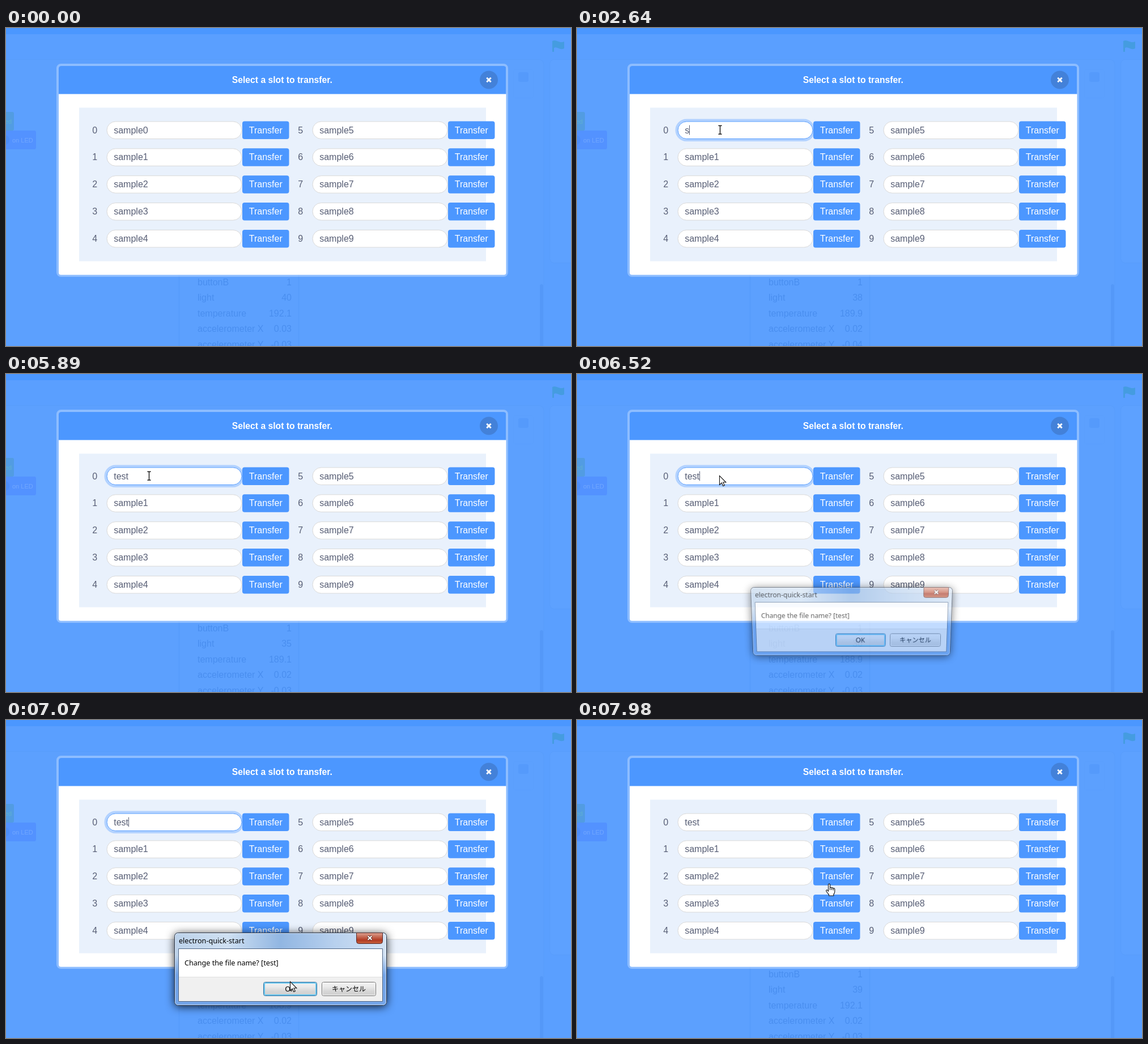
Animation, 997 px wide and 561 px high, one loop 8000 ms. Source, as an HTML page with a canvas:

```html
<!DOCTYPE html>
<html lang="en">
<head>
<meta charset="utf-8">
<title>Slot transfer</title>
<style>
html, body { margin: 0; width: 100%; height: 100%; overflow: hidden; background: #5da1ff; }
canvas { display: block; }
</style>
</head>
<body>
<canvas id="stage" width="997" height="561"></canvas>
<script>
const W = 997, H = 561, LOOP = 8000;
const BLUE = '#4c97ff', INK = '#575e75';
const ARIAL = '"Liberation Sans", Arial, sans-serif';
const UI = '"Noto Sans", "Noto Sans CJK JP", sans-serif';
const DIALOG_OPEN = 6440, DIALOG_CLOSE = 7300, FOCUS = 1480, BLUR = 7380;

const stage = document.getElementById('stage').getContext('2d');

const typed = [
  [0, 'sample0'], [1780, 'sample'], [2020, 'sampl'], [2170, 'samp'], [2320, 'sam'],
  [2470, 'sa'], [2640, 's'], [2940, ''], [3650, 't'], [4260, 'te'], [4730, 'tes'], [5050, 'test']
];

// time, light, temperature, accelerometer X, accelerometer Y
const sensors = [
  [0, 40, 192.1, .03, -.03], [230, 38, 190.1, .02, -.03], [540, 36, 189.5, .03, -.04],
  [920, 39, 189.9, .02, -.03], [1230, 37, 189.1, .03, -.05], [1640, 41, 189.5, .02, -.03],
  [2170, 38, 189.9, .02, -.04], [2790, 36, 189.1, .02, -.04], [3330, 39, 190.3, .03, -.03],
  [3800, 40, 189.5, .02, -.05], [4260, 37, 188.9, .03, -.03], [4880, 40, 189.7, .02, -.04],
  [5400, 38, 190.1, .03, -.04], [5890, 35, 189.1, .02, -.03], [6440, 36, 188.9, .02, -.03],
  [7450, 38, 190.3, .03, -.04], [7760, 39, 192.1, .02, -.03]
];

// pointer stops: time, x, y
const route = [
  [70, 783, 330], [850, 258, 184], [1310, 251, 179], [6600, 251, 179],
  [7000, 501, 461], [7380, 501, 461], [7900, 445, 289]
];

const latest = (list, t) => list.findLast(entry => entry[0] <= t);

function box(c, x, y, w, h, r, fill, stroke, line = 1) {
  c.beginPath();
  c.roundRect(x, y, w, h, r);
  if (fill) { c.fillStyle = fill; c.fill(); }
  if (stroke) { c.strokeStyle = stroke; c.lineWidth = line; c.stroke(); }
}

function text(c, str, x, y, color, font = '16px ' + ARIAL, align = 'left') {
  c.font = font;
  c.fillStyle = color;
  c.textAlign = align;
  c.fillText(str, x, y);
}

function cross(c, x, y, r, color, width) {
  c.beginPath();
  c.moveTo(x - r, y - r); c.lineTo(x + r, y + r);
  c.moveTo(x + r, y - r); c.lineTo(x - r, y + r);
  c.strokeStyle = color;
  c.lineWidth = width;
  c.stroke();
}

function gradient(c, x0, y0, x1, y1, ...colors) {
  const g = c.createLinearGradient(x0, y0, x1, y1);
  colors.forEach((color, i) => g.addColorStop(i / (colors.length - 1), color));
  return g;
}

function drawEditor(c, t) {
  c.fillStyle = '#e5f0ff';
  c.fillRect(0, 0, W, H);
  c.fillStyle = BLUE;
  c.fillRect(0, 0, W, 11);
  box(c, -10, 55.5, 959, 600, 9, '#f9f9f9', '#c4ccd8');
  box(c, 959.5, 55.5, 60, 359, 8, '#ffffff', '#c4ccd8');
  box(c, 895.5, 73.5, 35, 50, 3, null, '#dde2ea');
  box(c, 904, 78, 18, 17, 3, '#a9b9dc');
  box(c, 942, 452, 6, 120, 3, '#a0a8b8');
  box(c, 305.5, 300, 211, 290, 6, '#f4f6fa', '#c0c8d8', 2);
  box(c, -5, 181, 58, 33, 3, '#9966ff');
  box(c, -10, 189, 16, 17, 8, '#5a3cc0');

  const [, light, temperature, ax, ay] = latest(sensors, t);
  const readings = [
    ['buttonB', 1], ['light', light], ['temperature', temperature.toFixed(1)],
    ['accelerometer X', ax.toFixed(2)], ['accelerometer Y', ay.toFixed(2)]
  ];
  readings.forEach(([label, value], i) => {
    const y = 453.5 + i * 27.6;
    text(c, label, 338, y, '#303a58');
    text(c, value, 504, y, '#303a58', undefined, 'right');
  });

  c.fillStyle = 'rgba(76,151,255,.9)';
  c.fillRect(0, 0, W, H);

  box(c, -5, 148, 19, 33, 3, '#529ce2');
  text(c, 'ed', -2, 169, '#5fb0cf', '11px ' + ARIAL);
  text(c, 'on LED', 11, 202, '#72a8ff', '11px ' + ARIAL);
  c.beginPath();
  c.moveTo(964, 23);
  c.bezierCurveTo(971, 19, 976, 28, 985, 24);
  c.lineTo(985, 36);
  c.bezierCurveTo(977, 40, 973, 32, 967, 35);
  c.lineTo(967, 42); c.lineTo(964, 42);
  c.closePath();
  c.fillStyle = '#459ce0';
  c.fill();
}

const slots = Array.from({ length: 10 }, (_, i) => ({
  id: i, x: 177.5 + (i > 4 ? 363 : 0), y: 164.5 + (i % 5) * 47.85
}));

function hitTest(x, y) {
  for (const s of slots) {
    if (y < s.y || y > s.y + 31.5) continue;
    if (x >= s.x && x <= s.x + 238) return { kind: 'ibeam', id: s.id };
    if (x >= s.x + 239.5 && x <= s.x + 322) return { kind: 'hand' };
  }
  return { kind: 'arrow' };
}

function drawModal(c, t, hovered) {
  box(c, 91, 65, 793, 372, 6, null, 'rgba(255,255,255,.3)', 4);
  box(c, 93, 67, 789.5, 368.5, 4, '#fff');
  box(c, 93, 67, 789.5, 49.5, [4, 4, 0, 0], BLUE);
  text(c, 'Select a slot to transfer.', 487.3, 96.5, '#fff', 'bold 15.7px ' + ARIAL, 'center');
  c.beginPath();
  c.arc(852, 91.5, 16, 0, Math.PI * 2);
  c.fillStyle = '#4381d9';
  c.fill();
  cross(c, 852, 91.5, 3.7, '#fff', 3);
  c.fillStyle = '#e9f1fc';
  c.fillRect(129, 140.5, 718, 271);

  const focused = t >= FOCUS && t < BLUR;
  const [lastKey, entry] = latest(typed, t);
  for (const s of slots) {
    const active = s.id === 0 && focused;
    const base = s.y + 21;
    text(c, s.id, s.x - 25.3, base, INK);
    if (active) box(c, s.x - 2, s.y - 2, 242.5, 35.5, 18, null, '#b2d2ff', 4);
    box(c, s.x + .5, s.y + .5, 238, 30.5, 15.5, '#fff', active || hovered === s.id ? BLUE : '#d9d9d9');
    const label = s.id ? 'sample' + s.id : entry;
    text(c, label, s.x + 12.7, base, INK);
    if (active) {
      const since = Math.min(t, DIALOG_OPEN) - Math.max(lastKey, FOCUS);
      if (Math.floor(since / 500) % 2 === 0) {
        c.fillRect(Math.round(s.x + 12.7 + c.measureText(label).width), s.y + 7, 1, 17);
      }
    }
    box(c, s.x + 239.5, s.y, 82.5, 31.5, 4, BLUE);
    text(c, 'Transfer', s.x + 280.8, base, '#fff', undefined, 'center');
  }
}

function makeDialog() {
  const canvas = document.createElement('canvas');
  canvas.width = W;
  canvas.height = H;
  const c = canvas.getContext('2d');
  const font = '12.6px ' + UI;

  c.shadowColor = 'rgba(0,0,0,.85)';
  c.shadowBlur = 16;
  c.shadowOffsetY = 2;
  box(c, 297.5, 375.5, 374, 128, 6, '#9fc0ea');
  c.shadowColor = 'transparent';
  box(c, 297.5, 375.5, 374, 128, 6,
    gradient(c, 297, 0, 672, 0, '#bcd2ea', '#cfe0f2', '#91b6e2', '#b7d0ee', '#d5e4f4'));
  box(c, 297.5, 375.5, 374, 128, 6,
    gradient(c, 0, 415, 0, 450, 'rgba(108,160,232,0)', 'rgba(108,160,232,.9)'), '#26364d');
  box(c, 298.5, 376.5, 372, 126, 5, null, 'rgba(255,255,255,.55)');
  text(c, 'electron-quick-start', 305, 393.5, '#000', font);

  box(c, 618.5, 375.5, 46, 19, [0, 0, 4, 4],
    gradient(c, 0, 375, 0, 395, '#dfa393', '#c8705b', '#b23a22', '#c9663f'), '#552a2a');
  cross(c, 642, 384.5, 3.5, '#5a2b25', 4);
  cross(c, 642, 384.5, 3.3, '#fff', 2.2);

  box(c, 304.5, 403.5, 360, 93, 0, '#fff', '#4e6585');
  c.fillStyle = '#f0f0f0';
  c.fillRect(305, 453, 359, 43);
  c.fillStyle = '#dfdfdf';
  c.fillRect(305, 453, 359, 1);
  text(c, 'Change the file name? [test]', 315, 432.5, '#000', font);

  const face = gradient(c, 0, 462, 0, 487, '#f3f3f3', '#ebebeb', '#d6d6d6', '#cfcfcf');
  box(c, 454.5, 462.5, 94, 24, 3, face, '#2f6c9c');
  box(c, 456, 464, 91, 21, 2, null, '#6cc7ee', 2);
  text(c, 'OK', 501, 478.5, '#000', font, 'center');
  box(c, 557.5, 462.5, 95, 24, 3, face, '#707070');
  box(c, 558.5, 463.5, 93, 22, 2, null, '#fafafa');
  text(c, 'キャンセル', 605, 478.5, '#000', '12px "Noto Sans CJK JP", "Noto Sans CJK", sans-serif', 'center');
  return canvas;
}

const dialog = makeDialog();

// The window tilts and fades as it opens and closes; tilt 0 is the resting pose.
function drawDialog(c, t) {
  if (t < DIALOG_OPEN) return;
  const tilt = t < DIALOG_CLOSE
    ? Math.max(0, 1.7 - .7 * Math.floor((t - DIALOG_OPEN) / 80))
    : .65 * (Math.floor((t - DIALOG_CLOSE) / 78) + 1);
  const alpha = 1 - .38 * tilt;
  if (alpha <= 0) return;
  if (tilt === 0) {
    c.drawImage(dialog, 0, 0);
    return;
  }
  const squash = 1 - .062 * tilt;
  c.globalAlpha = alpha;
  for (let y = 345; y < 535; y++) {
    const sy = 375 + (y - 375 - tilt) / squash;
    const k = 1 - tilt * (.048 + .024 * (sy - 375) / 129);
    c.drawImage(dialog, 0, sy, W, 1 / squash, 484.5 * (1 - k), y, W * k, 1);
  }
  c.globalAlpha = 1;
}

function pointerAt(t) {
  const next = route.findIndex(stop => stop[0] > t);
  if (next < 0) return route.at(-1).slice(1);
  const [t0, x0, y0] = route[next - 1], [t1, x1, y1] = route[next];
  const p = Math.floor((t - t0) / 78) * 78 / (t1 - t0);
  const e = 1 - (1 - p) ** 2;
  return [x0 + (x1 - x0) * e, y0 + (y1 - y0) * e];
}

const shapes = {
  arrow: new Path2D('M.5 .5V16.5L4.2 13L6.8 18.6L9.3 17.5L6.8 12H11.8Z'),
  hand: new Path2D('M-1.5 1.2Q0 -1 1.5 1.2V7Q3.5 5.5 4.5 7.3Q6.5 6.2 7.3 8Q9.6 7.2 9.8 9.5' +
    'V14Q9.5 17 7.8 18.5V21H-.5V19Q-3 16.5 -5.3 12.8Q-5.5 10.3 -3.3 11L-1.5 13Z'),
  knuckles: new Path2D('M1.5 7V11M4.5 7.3V11M7.3 8V11.5'),
  ibeam: new Path2D('M-3 -7.5H-1Q0 -7.5 0 -6.5Q0 -7.5 1 -7.5H3M0 -6.5V6.5M-3 7.5H-1Q0 7.5 0 6.5Q0 7.5 1 7.5H3')
};

function drawPointer(c, kind, x, y) {
  c.save();
  c.translate(Math.round(x), Math.round(y));
  c.strokeStyle = '#111';
  c.lineWidth = 1.1;
  if (kind === 'ibeam') {
    c.translate(1.5, .8);
    c.strokeStyle = '#fff';
    c.lineWidth = 3;
    c.stroke(shapes.ibeam);
    c.strokeStyle = '#111';
    c.lineWidth = 1.4;
    c.stroke(shapes.ibeam);
  } else {
    c.fillStyle = '#fff';
    c.fill(shapes[kind]);
    c.stroke(shapes[kind]);
    if (kind === 'hand') c.stroke(shapes.knuckles);
  }
  c.restore();
}

function render(t) {
  const visible = t >= route[0][0];
  const [x, y] = visible ? pointerAt(t) : [-50, -50];
  const modalBlocked = t >= DIALOG_OPEN && t < DIALOG_CLOSE;
  const target = modalBlocked ? { kind: 'arrow' } : hitTest(x, y);
  drawEditor(stage, t);
  drawModal(stage, t, target.id);
  drawDialog(stage, t);
  if (visible) drawPointer(stage, target.kind, x, y);
}

const start = performance.now();
function tick() {
  render((performance.now() - start) % LOOP);
  requestAnimationFrame(tick);
}
tick();
</script>
</body>
</html>
```
